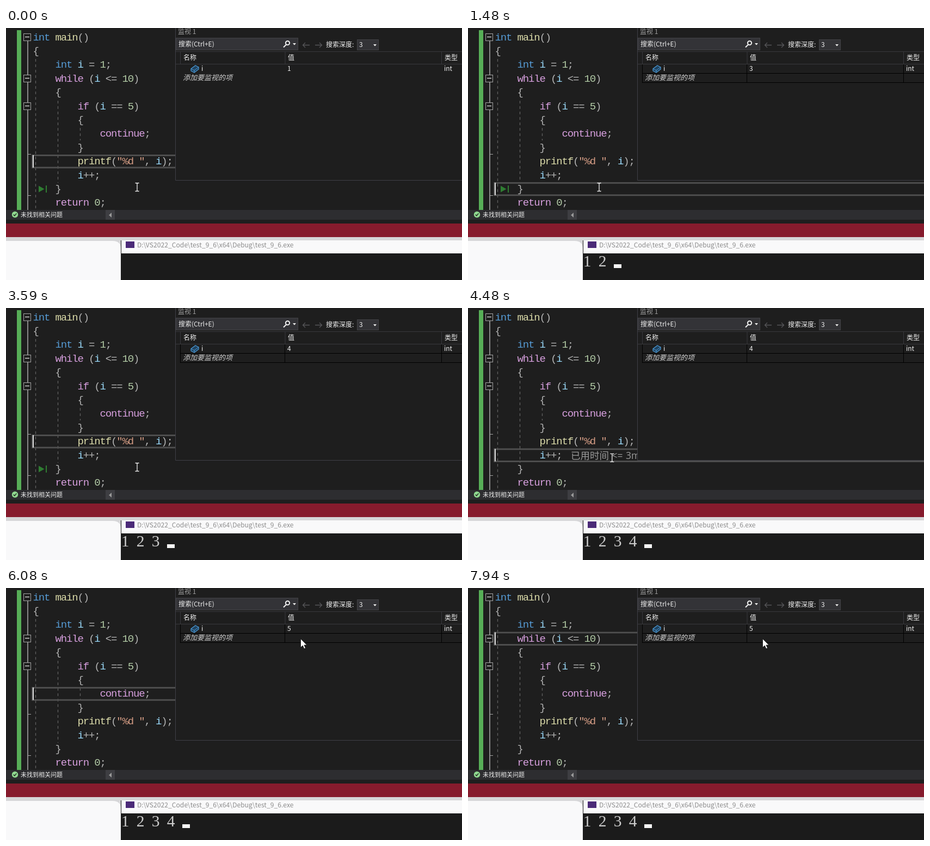
Animation of 838x464 px, one loop 8000 ms. Source, as an HTML page:

```html
<!DOCTYPE html>
<html lang="zh">
<head>
<meta charset="utf-8">
<style>
html, body { margin: 0; width: 100%; height: 100%; overflow: hidden; background: #1e1e1e; }
svg { display: block; width: 838px; height: 464px; }
text { white-space: pre; }
.code { font: 19px "Liberation Mono", monospace; letter-spacing: -1.15px; }
.ui { font: 12px "Noto Sans CJK SC", "Noto Sans CJK", sans-serif; fill: #f0f0f0; }
.hint { font: 17.5px "Open Sans", "Noto Sans CJK SC", "Noto Sans CJK", sans-serif; word-spacing: 1px; fill: #999; }
.out { font: 29.5px "Liberation Serif", serif; fill: #ccc; text-anchor: middle; }
</style>
</head>
<body>
<svg id="stage" viewBox="0 0 838 464" xmlns="http://www.w3.org/2000/svg">
  <rect width="838" height="464" fill="#1e1e1e"/>
  <rect x="20" y="4" width="8" height="331" fill="#57ae57"/>
  <g id="fold" fill="none" stroke="#a5a5a5"></g>
  <g stroke="#606060" stroke-width="1.3" stroke-dasharray="5 5">
    <path d="M54.5 57V335M95.5 134V285M136.5 184V207"/>
  </g>
  <g id="mark">
    <rect x="48.5" y="1.5" width="800" height="22.5" fill="none" stroke="#505050" stroke-width="2.8"/>
    <rect id="caret" x="49" y="1" width="2" height="23" fill="#dcdcdc"/>
  </g>
  <g id="code" class="code"></g>
  <text id="hint" class="hint">已用时间 &lt;= 3ms</text>
  <path id="runto" d="M60 290.5L70.5 296.5L60 302.5ZM73 290H75V303H73Z" fill="#2f7d32"/>

  <g id="panel">
    <path d="M311 0H838V281H311Z" fill="#1e1e1e"/>
    <path d="M311.5 0V280.5H838" fill="none" stroke="#3f3f46"/>
    <text class="ui" x="316" y="11" style="fill:#a0a0a0">监视 1</text>
    <rect x="312.5" y="18.5" width="224" height="22" fill="#333337" stroke="#434346"/>
    <text class="ui" x="317" y="34">搜索(Ctrl+E)</text>
    <g fill="none" stroke="#f0f0f0" stroke-width="2">
      <circle cx="517.5" cy="27.5" r="3.6"/><path d="M515 30.5L510 35.5"/>
    </g>
    <path d="M558 31.5H545.5M550 27L545.5 31.5L550 36M568 31.5H580.5M576 27L580.5 31.5L576 36" fill="none" stroke="#555558" stroke-width="1.3"/>
    <text class="ui" x="588" y="35">搜索深度:</text>
    <rect x="645.5" y="21.5" width="39" height="19" fill="#333337" stroke="#434346"/>
    <text class="ui" x="649" y="35">3</text>
    <path d="M527 28H533L530 31.5ZM675 30H681L678 33.5Z" fill="#f0f0f0"/>
    <path d="M312 43.5H838M320.5 44V66M513 44V66M800.5 44V66M312 66.5H838" stroke="#39393d"/>
    <text class="ui" x="326" y="59">名称</text>
    <text class="ui" x="518" y="59">值</text>
    <text class="ui" x="806" y="59">类型</text>
    <path id="grid" d="M320.5 67V100M512.5 67V100M800.5 67V100M320 83.5H838M320 100.5H838" stroke="#000" fill="none"/>
    <path d="M340 75L348 69L354 72V76L346 82L340 79Z" fill="#20425e" stroke="#4b9bd8" stroke-width="1.2"/>
    <path d="M340 75L346 78L354 72M346 78V82" fill="none" stroke="#4b9bd8"/>
    <text class="ui" x="359" y="79">i</text>
    <text class="ui" id="val" x="517" y="79"></text>
    <text class="ui" x="805" y="79">int</text>
    <text class="ui" x="325" y="95.5" style="font-size:13px;font-style:italic;fill:#d0d0d0">添加要监视的项</text>
  </g>

  <rect y="335" width="838" height="18" fill="#2d2d30"/>
  <rect x="183" y="335" width="17" height="18" fill="#3e3e42"/>
  <path d="M194 340V349L189 344.5Z" fill="#999"/>
  <circle cx="16.5" cy="343.5" r="5.7" fill="#8fd88f"/>
  <path d="M13.7 343.5L15.8 345.8L19.4 341.4" fill="none" stroke="#1e1e1e" stroke-width="1.4"/>
  <text class="ui" x="27" y="348" style="font-size:11px">未找到相关问题</text>
  <rect y="360" width="838" height="25" fill="#861b2d"/>
  <rect y="385" width="838" height="79" fill="#d6d6d8"/>
  <path d="M0 392H196Q211 392 211 407V464H0Z" fill="#f9f9fa"/>
  <rect x="212" y="391" width="626" height="24" fill="#f9f9fa"/>
  <rect x="212" y="415" width="626" height="49" fill="#1b1b1b"/>
  <rect x="211" y="391" width="1" height="73" fill="#1b1b1b"/>
  <rect x="220" y="393" width="16" height="12" fill="#4b2a78"/>
  <text class="ui" x="241" y="404" style="fill:#8c8c8c;letter-spacing:.09px">D:\VS2022_Code\test_9_6\x64\Debug\test_9_6.exe</text>
  <g id="out" class="out"></g>
  <rect id="block" y="435" width="14" height="7" fill="#f5f5f5"/>

  <path id="beam" d="M-3.5 -7.5H-1L0 -6.5L1 -7.5H3.5M0 -6.5V6.5M-3.5 7.5H-1L0 6.5L1 7.5H3.5" fill="none" stroke="#f0f0f0" stroke-width="1.3"/>
  <path id="arrow" d="M0 0V16L3.8 12.6L6.4 18.3L9 17.1L6.4 11.6H11.4Z" fill="#fff" stroke="#111" stroke-width=".8"/>
</svg>
<script>
const NS = "http://www.w3.org/2000/svg", LOOP = 8000;
const $ = id => document.getElementById(id);
const lineY = n => 23 + 25.4 * n;

function add(parent, tag, attrs, text) {
  const el = document.createElementNS(NS, tag);
  for (const k in attrs) el.setAttribute(k, attrs[k]);
  if (text) el.textContent = text;
  return $(parent).appendChild(el);
}

const SOURCE = `int main()
{
    int i = 1;
    while (i <= 10)
    {
        if (i == 5)
        {
            continue;
        }
        printf("%d ", i);
        i++;
    }
    return 0;`;

function colour(tok) {
  if (/^"/.test(tok)) return "#d69d85";
  if (tok === "int") return "#569cd6";
  if (/^(while|if|continue|return)$/.test(tok)) return "#d8a0df";
  if (/^(main|printf)$/.test(tok)) return "#dcdcaa";
  if (tok === "i") return "#9cdcfe";
  return /^\d/.test(tok) ? "#b5cea8" : "#b4b4b4";
}

SOURCE.split("\n").forEach((line, n) => {
  for (const m of line.matchAll(/"[^"]*"|\w+|[^\w\s"]+/g))
    add("code", "text", { x: 49.5 + 10.25 * m.index, y: lineY(n) - 0.5, fill: colour(m[0]) }, m[0]);
});

for (const y of [16.5, 92.5, 143.5]) {
  add("fold", "rect", { x: 32.5, y: y - 6, width: 13, height: 13 });
  add("fold", "path", { d: `M35 ${y}H43`, stroke: "#d8d8d8", "stroke-width": 1.4 });
}
add("fold", "path", { d: "M40 24V86M40 100V137M40 150V335", "stroke-width": 1.6 });
add("fold", "path", { d: "M40 232.5H46M40 308.5H46" });

const digits = [1, 2, 3, 4].map(n => add("out", "text", { x: 191 + 28 * n, y: 439 }, String(n)));

// Debugger stops: [time, code line]
const WHILE = 3, IF = 5, CONT = 7, PRINT = 9, INC = 10, END = 11;
const STOPS = [
  [0, PRINT], [120, INC], [270, END], [540, WHILE], [660, IF], [810, PRINT],
  [930, INC], [1210, END], [1510, WHILE], [1660, IF], [1820, PRINT],
  [1970, INC], [2250, END], [2550, WHILE], [2700, IF], [3590, PRINT],
  [3900, INC], [5570, END], [5810, WHILE], [5930, IF], [6080, CONT],
  [6350, WHILE], [6590, IF], [6870, CONT], [7110, WHILE], [7390, IF],
  [7820, CONT], [7940, WHILE]
];
const VALUES = [390, 1360, 2400, 5690];
const PRINTS = [120, 930, 1970, 3900];
const CARET_OFF = [[3220, 3590], [4490, 5000], [5420, 5570]];
const passed = (list, t) => list.filter(x => t >= x).length;

function pointer(t) {
  if (t < 4360) return [241, 293];
  const step = Math.min(8, 1 + Math.floor((t - 4360) / 128.5));
  if (step > 6) {
    const k = (step - 6) / 2;
    return [562 - 20.5 * k, 61 + 32.5 * k];
  }
  const k = step / 6, e = k * k * (3 - 2 * k);
  return [241 + 321 * e, 293 - 232 * e];
}

const show = (id, on) => $(id).setAttribute("visibility", on ? "visible" : "hidden");
const move = (id, x, y) => $(id).setAttribute("transform", `translate(${x} ${y})`);

function draw(t) {
  const [since, line] = STOPS[passed(STOPS.map(s => s[0]), t) - 1];
  move("mark", 0, lineY(line) - 18.6);
  show("caret", !CARET_OFF.some(([a, b]) => t >= a && t < b));

  show("hint", t - since >= 400 && (line === IF || line === INC));
  $("hint").setAttribute("x", line === IF ? 262 : 189);
  $("hint").setAttribute("y", lineY(line) + 1);

  $("val").textContent = 1 + passed(VALUES, t);
  show("grid", t >= VALUES[0]);

  const printed = passed(PRINTS, t);
  digits.forEach((d, i) => d.setAttribute("visibility", i < printed ? "visible" : "hidden"));
  $("block").setAttribute("x", 212 + 28 * printed);
  show("block", printed > 0);

  const [x, y] = pointer(t), inPanel = x > 311 && y < 281;
  move("beam", x, y);
  move("arrow", x, y);
  show("beam", !inPanel);
  show("arrow", inPanel);
  show("runto", t < 4360);
}

const start = performance.now();
function tick(now) {
  draw(Math.max(0, now - start) % LOOP);
  requestAnimationFrame(tick);
}
draw(0);
requestAnimationFrame(tick);
</script>
</body>
</html>
```
